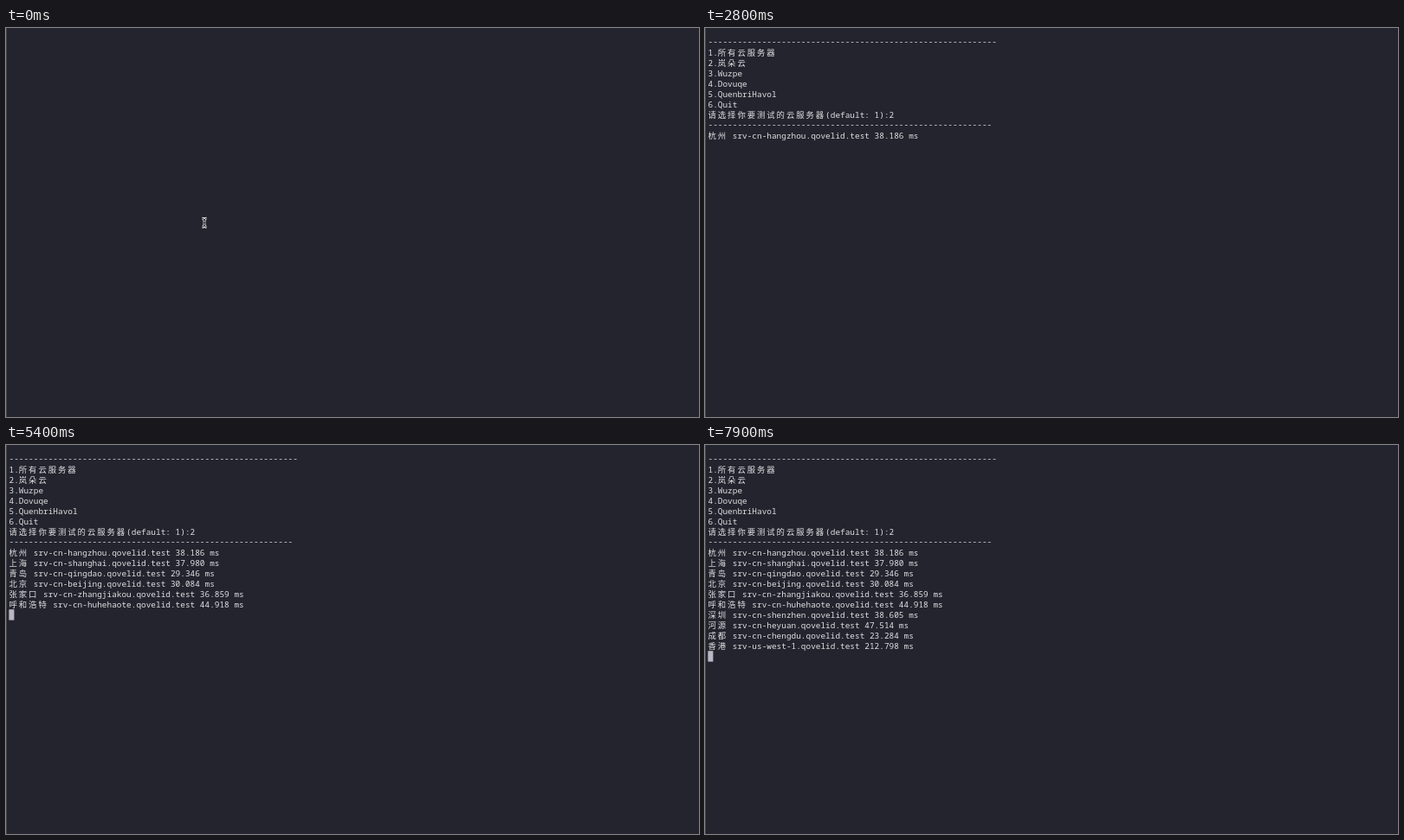
Animation, 800 px wide and 450 px high, one loop 8000 ms. Source, as an HTML page with a canvas:

```html
<!DOCTYPE html>
<html lang="zh-CN">
<head>
<meta charset="utf-8">
<title>Ping test</title>
<style>
html, body { margin: 0; width: 100%; height: 100%; overflow: hidden; background: #24242e; }
canvas { display: block; }
</style>
</head>
<body>
<canvas width="800" height="450"></canvas>
<script>
const ctx = document.querySelector('canvas').getContext('2d');
const LOOP = 8000, CELL = 5.65, LEFT = 3.5, LINE = 12;
const ENTER = 700, MENU = 1300, ANSWER = 1900, FIRST_PING = 2500;
const BLINK_ON = 300, BLINK_OFF = 100;
const BG = '#24242e', INK = '#e0e0e3';

const menu = `${'-'.repeat(59)}
1.所有云服务器
2.岚朵云
3.Wuzpe
4.Dovuqe
5.QuenbriHavol
6.Quit
请选择你要测试的云服务器(default: 1):`.split('\n');

const pings = `杭州 srv-cn-hangzhou.qovelid.test 38.186 ms
上海 srv-cn-shanghai.qovelid.test 37.980 ms
青岛 srv-cn-qingdao.qovelid.test 29.346 ms
北京 srv-cn-beijing.qovelid.test 30.084 ms
张家口 srv-cn-zhangjiakou.qovelid.test 36.859 ms
呼和浩特 srv-cn-huhehaote.qovelid.test 44.918 ms
深圳 srv-cn-shenzhen.qovelid.test 38.605 ms
河源 srv-cn-heyuan.qovelid.test 47.514 ms
成都 srv-cn-chengdu.qovelid.test 23.284 ms
香港 srv-us-west-1.qovelid.test 212.798 ms`.split('\n');

const cellsOf = ch => ch > '\u2e80' ? 2 : 1;
const answerCol = [...menu.at(-1)].reduce((sum, ch) => sum + cellsOf(ch), 0);
// Replies come at a steady pace, shown on 100 ms ticks
const arrival = i => FIRST_PING + Math.round(i * 5.78) * 100;

const lines = [
  ...menu.map((text, row) => ({ at: MENU, row, text })),
  { at: ANSWER, row: 7, text: '2', col: answerCol },
  { at: ANSWER, row: 8, text: '-'.repeat(58) },
  ...pings.map((text, i) => ({ at: arrival(i), row: 9 + i, text }))
];

// Each move of the cursor restarts its blinking
const moves = [
  { at: 200, row: -1 },
  { at: ENTER, row: 0 },
  { at: MENU, row: 7, col: answerCol },
  { at: ANSWER, row: 9 },
  ...pings.map((_, i) => ({ at: arrival(i), row: 10 + i }))
];

function drawText({ row, text, col = 0 }) {
  const baseline = (text.startsWith('--') ? 19 : 20) + row * LINE;
  for (const ch of text) {
    ctx.fillText(ch, LEFT + col * CELL, baseline);
    col += cellsOf(ch);
  }
}

function drawCursor(t) {
  const move = moves.findLast(m => m.at <= t);
  if (!move || (t - move.at) % (BLINK_ON + BLINK_OFF) >= BLINK_ON) return;
  const { row, col = 0 } = move;
  ctx.fillStyle = '#bbb8c6';
  ctx.fillRect(3.4 + col * CELL, 10.2 + row * LINE, 6, 12.4);
}

function drawPointer() {
  const beam = new Path2D('M226.5 220.3Q229 220.3 229 223V227.5Q229 230.2 226.5 230.2' +
    'M231.5 220.3Q229 220.3 229 223M229 227.5Q229 230.2 231.5 230.2M227.6 225.3H230.4');
  for (const [color, width] of [['#e8e8ea', 2.9], [BG, 1]]) {
    ctx.strokeStyle = color;
    ctx.lineWidth = width;
    ctx.stroke(beam);
  }
}

function draw(t) {
  ctx.fillStyle = BG;
  ctx.fillRect(0, 0, 800, 450);
  ctx.fillStyle = '#484850';
  ctx.fillRect(0, 0, 1, 450);
  ctx.font = '500 9.4px "Noto Sans Mono", "Noto Sans CJK SC", "Noto Sans CJK", monospace';
  ctx.fillStyle = INK;
  lines.filter(line => line.at <= t).forEach(drawText);
  drawCursor(t);
  if (t < ENTER) drawPointer();
}

const start = performance.now();
function tick() {
  draw((performance.now() - start) % LOOP);
  requestAnimationFrame(tick);
}
tick();
</script>
</body>
</html>
```
